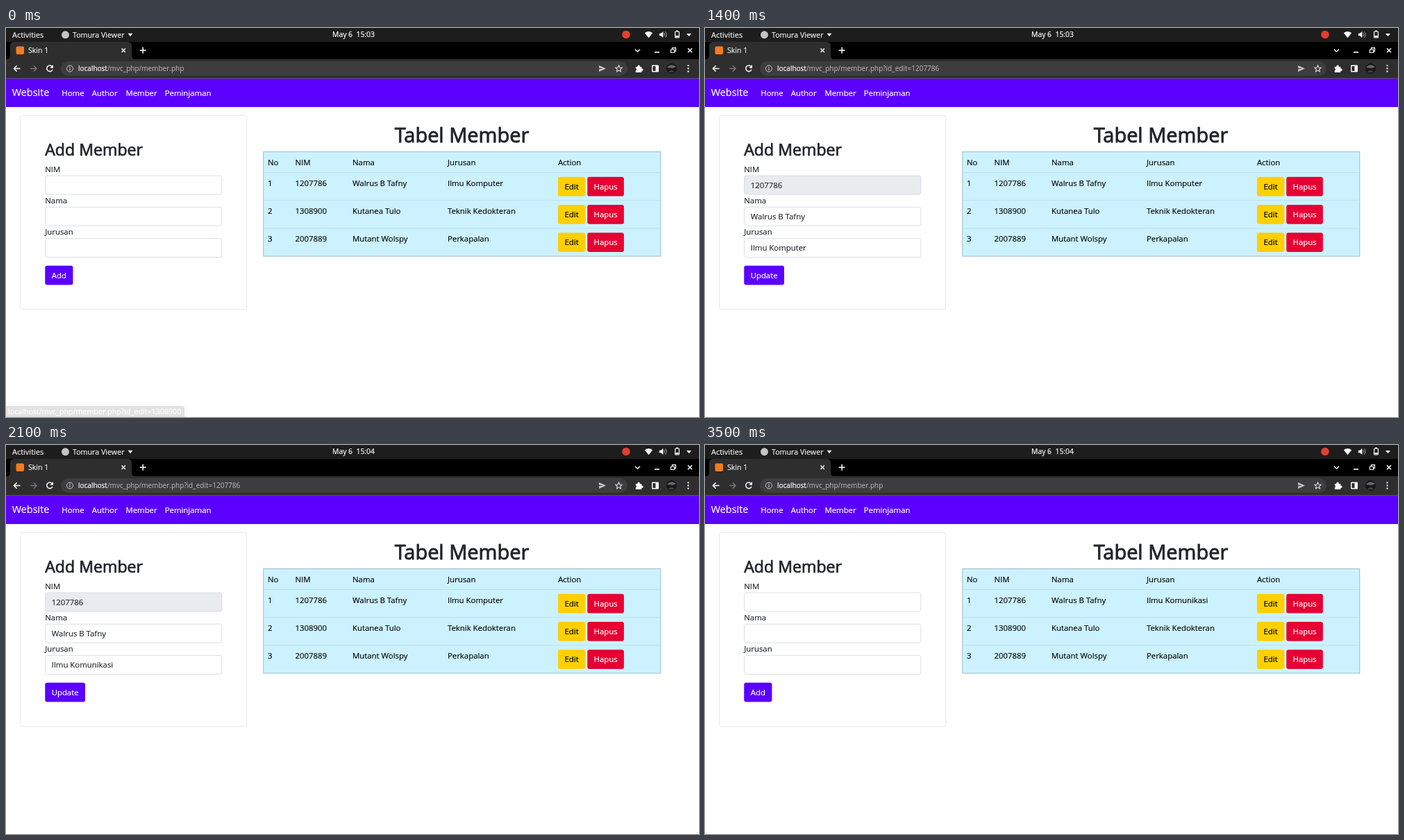
Recreate the animation shown at these times as an HTML page. Size 998x561 px, loop 4.2 s.

```html
<!DOCTYPE html>
<html lang="id">
<head>
<meta charset="utf-8">
<title>Tabel Member</title>
<style>
  html, body { margin: 0; width: 100%; height: 100%; overflow: hidden; background: #fff; }
  svg { display: block; width: 998px; height: 561px; font-family: "Open Sans", "Noto Sans", sans-serif; }
</style>
</head>
<body>
<svg id="stage" viewBox="0 0 998 561"></svg>
<script>
const STEP = 700;
const PAGE_SCALE = 998 / 1366; // the web page is laid out on a 1366 px wide screen
const stage = document.getElementById('stage');

const ink = '#212529', violet = '#5b00ff', yellow = '#ffd000', red = '#e60033';

// One entry per screen state, each shown for STEP ms.
const form = jurusan => ['1207786', 'Walrus B Tafny', jurusan];
const states = [
  { time: '15:03', status: '1308900', faded: true },
  { time: '15:03', status: '1207786', focus: 'edit' },
  { time: '15:03', values: form('Ilmu Komputer') },
  { time: '15:04', values: form('Ilmu Komunikasi') },
  { time: '15:04', values: form('Ilmu Komunikasi'), focus: 'update' },
  { time: '15:04', saved: true },
];

// A thin outline in the text colour gives the strokes their weight.
const text = (s, x, y, size = 15.6, fill = ink, weight = 0.2, anchor = 'start') =>
  `<text x="${x}" y="${y}" font-size="${size}" fill="${fill}" stroke="${fill}"
    stroke-width="${weight}" text-anchor="${anchor}">${s}</text>`;
const rect = (x, y, w, h, fill, r = 0, extra = '') =>
  `<rect x="${x}" y="${y}" width="${w}" height="${h}" rx="${r}" fill="${fill}" ${extra}/>`;
const box = (x, y, w, h, fill, r, border) =>
  rect(x + 0.5, y + 0.5, w - 1, h - 1, fill, r, `stroke="${border}"`);
const line = (d, color = '#fff', width = 1.4) =>
  `<path d="${d}" fill="none" stroke="${color}" stroke-width="${width}"/>`;
const shape = (d, fill = '#fff') => `<path d="${d}" fill="${fill}"/>`;
const dot = (x, y, r, fill, extra = '') =>
  `<circle cx="${x}" cy="${y}" r="${r}" fill="${fill}" ${extra}/>`;

function button(label, x, y, w, fill, color, ring) {
  const halo = ring ? rect(x - 3.5, y - 3.5, w + 7, 45, ring, 7) : '';
  return halo + rect(x, y, w, 38, fill, 4) +
    text(label, x + w / 2, y + 24.6, 15.6, color, 0.3, 'middle');
}

function desktopBar(time) {
  return rect(0, 0, 998, 20, '#1d1d1d') +
    text('Activities', 9, 13.6, 11, '#eee') +
    dot(85.5, 9.8, 5.5, '#c4c4c4') +
    text('Tomura Viewer', 96, 13.6, 10.7, '#eee') +
    shape('M175.5 7.8h7l-3.5 4.4z', '#eee') +
    text(`May 6\u00a0 ${time}`, 470, 13.4, 10.4, '#fff') +
    dot(893, 9.5, 5.8, '#e2402f') +
    shape('M919.8 7.2Q925.5 2.6 931.2 7.2L925.5 14.2z') +
    shape('M941 7.7h2.3l3-2.9v9.4l-3-2.9H941z') +
    line('M947.7 7q1.7 2.5 0 5M949.4 5.2q3.4 4.3 0 8.6', '#aaa', 1) +
    rect(963.6, 5, 5.8, 9, 'none', 1, 'stroke="#fff" stroke-width="1.2"') +
    rect(965, 3.6, 3, 1.5, '#fff') + rect(964.5, 11, 4, 2.4, '#fff') +
    shape('M980 8h7l-3.5 4z');
}

function tabStrip() {
  return rect(0, 20, 998, 26, '#000') +
    shape('M0 45.5Q6 45.5 6 39.5V26Q6 20 12 20H175Q181 20 181 26V39.5Q181 45.5 187 45.5z', '#2e2e2e') +
    rect(14.5, 26.5, 11.5, 11.5, '#f47b20', 2) +
    text('Skin 1', 32, 36, 10.6, '#eee') +
    line('M166.5 29.5l5.4 5.4m0-5.4l-5.4 5.4') +
    line('M192.7 32.3h9M197.2 27.8v9', '#fff', 1.5) +
    line('M906 30.8l3.5 3.4 3.5-3.4') +
    line('M934 35h7', '#fff', 1.6) +
    line('M957.5 31h5v4.5h-5zM959.5 31v-2.3h5v4.6h-2', '#fff', 1.2) +
    line('M982 29.3l6 6m0-6l-6 6', '#fff', 1.5);
}

function toolbar(query) {
  const star = Array.from({ length: 10 }, (_, i) => {
    const a = i * Math.PI / 5, r = i % 2 ? 2.3 : 5;
    return `${882.5 + r * Math.sin(a)} ${58.8 - r * Math.cos(a)}`;
  }).join('L');
  const url = `localhost<tspan fill="#bdbdbd" stroke="none">/mvc_php/member.php${query}</tspan>`;
  return rect(0, 45, 998, 27.3, '#2e2e2e') + rect(0, 72, 998, 1, '#505050') +
    rect(79, 48, 816, 21, '#3d3d3d', 10.5) +
    line('M20.5 58.5h-9m4.2-4.3l-4.3 4.3 4.3 4.3', '#fff', 1.5) +
    line('M35 58.5h9m-4.2-4.3l4.3 4.3-4.3 4.3', '#777', 1.4) +
    line('M66.3 55.5A4.3 4.3 0 1 0 67 60', '#fff', 1.5) + shape('M68 53v4.7h-4.7z') +
    dot(92, 58.5, 4.5, 'none', 'stroke="#ccc"') +
    line('M92 57.7v3.2M92 55.8v1.1', '#ccc', 1.2) +
    text(url, 104, 62, 10, '#fff') +
    shape('M854 54l10 4.5-10 4.5v-3.5l6-1-6-1z', '#c8c8c8') +
    line(`M${star}z`, '#ddd', 1.1) +
    shape('M906.8 56h2.6a1.8 1.8 0 1 1 3.4 0h2.5v2.5a1.8 1.8 0 1 1 0 3.4v2h-8.5v-2.4a1.8 1.8 0 0 0 0-3.4z') +
    rect(930.7, 54.2, 8.6, 8.6, 'none', 0.5, 'stroke="#fff" stroke-width="1.4"') +
    rect(935.5, 54, 4, 9, '#fff') +
    dot(958.5, 58.5, 7.5, '#171717') +
    shape('M952 57Q958 50 965 56L960 58z', '#686868') +
    shape('M954 64Q958 58 963 64z', '#444') +
    [54.3, 58.5, 62.7].map(y => dot(982.5, y, 1.15, '#fff')).join('');
}

function navbar() {
  const links = [['Home', 110], ['Author', 169.5], ['Member', 236], ['Peminjaman', 313]];
  return rect(0, 100, 1366, 56, violet) +
    text('Website', 12, 134.5, 19.7, '#fff', 0.3) +
    links.map(([s, x]) => text(s, x, 133.6, 15.6, '#fff', 0.3)).join('');
}

function memberForm({ values, focus }) {
  const fields = ['NIM', 'Nama', 'Jurusan'].map((label, i) => {
    const y = 291 + i * 62;
    return text(label, 77, y - 6.6) +
      box(77, y, 349, 38, values && !i ? '#e9ecef' : '#fff', 4, '#ced4da') +
      text(values ? values[i] : '', 90, y + 24.6);
  });
  const pressed = focus === 'update';
  return box(28, 172, 447, 384, '#fff', 4, '#dfdfdf') +
    text('Add Member', 77, 251.5, 31.6, ink, 1) +
    fields.join('') +
    button(values ? 'Update' : 'Add', 77, 469, values ? 79 : 55,
      pressed ? '#4900cc' : violet, '#fff', pressed && '#9dabff');
}

function memberTable({ focus, saved }) {
  const columns = [516, 570, 683, 870.5, 1088];
  const row = (cells, y) => cells.map((s, i) => text(s, columns[i], y, 15.6, '#000')).join('');
  const members = [
    ['1207786', 'Walrus B Tafny', saved ? 'Ilmu Komunikasi' : 'Ilmu Komputer'],
    ['1308900', 'Kutanea Tulo', 'Teknik Kedokteran'],
    ['2007889', 'Mutant Wolspy', 'Perkapalan'],
  ];
  return text('Tabel Member', 898.5, 225.5, 39.6, ink, 1.2, 'middle') +
    box(507, 244, 784, 207, '#ccf2ff', 0, '#8ba6ae') +
    [285, 340, 395, 450].map(y => rect(508, y, 782, 1, '#b8dbe5')).join('') +
    row(['No', 'NIM', 'Nama', 'Jurusan', 'Action'], 271) +
    members.map((member, i) => {
      const y = 294 + i * 55, active = focus === 'edit' && !i;
      return row([i + 1, ...member], y + 18) +
        button('Edit', 1088, y, 54, active ? '#ffd60a' : yellow, '#000', active && '#d5c842') +
        button('Hapus', 1146, y, 72, red, '#fff');
    }).join('');
}

function statusBubble({ status, faded }) {
  if (!status) return '';
  return shape('M0 545H254Q257 545 257 548V561H0z', faded ? '#e2e2e2' : '#000') +
    text(`localhost/mvc_php/member.php?id_edit=${status}`, 3, 556.6, 10.7, '#fff');
}

function draw(state) {
  const page = navbar() + memberForm(state) + memberTable(state);
  stage.innerHTML = desktopBar(state.time) + tabStrip() +
    toolbar(state.values ? '?id_edit=1207786' : '') +
    `<g transform="scale(${PAGE_SCALE})">${page}</g>` + statusBubble(state);
}

let shown = -1;
function tick() {
  const index = Math.floor(performance.now() / STEP) % states.length;
  if (index !== shown) draw(states[shown = index]);
  requestAnimationFrame(tick);
}
tick();
</script>
</body>
</html>
```
